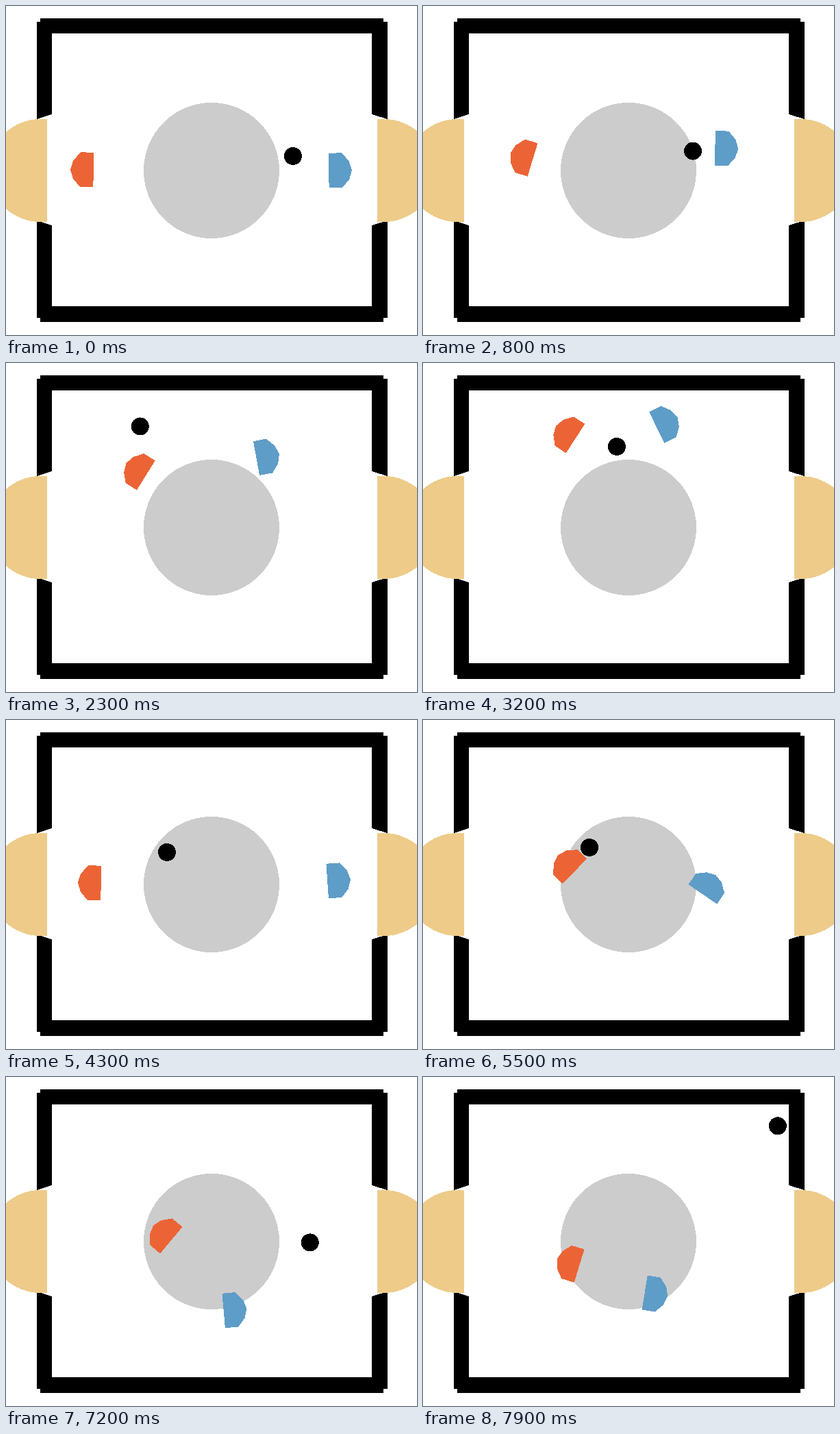
Animation of 600x480 px, one loop 8 s. Source, as an HTML page:

```html
<!DOCTYPE html>
<html>
<head>
<meta charset="utf-8">
<style>
  html, body { margin: 0; width: 100%; height: 100%; overflow: hidden; background: #fff; }
  svg { display: block; }
</style>
</head>
<body>
<svg width="600" height="480" viewBox="0 0 600 480" shape-rendering="crispEdges">
  <defs>
    <path id="paddle" d="M.3-25.3V25.3H-19L-29.5 13.2L-33.6 0L-29.5-13.2L-19-25.3Z"/>
    <path id="goal" d="M60 165H50A75 75 0 0 0 50 315H60Z"/>
  </defs>
  <circle cx="300" cy="240" r="99" fill="#ccc"/>
  <path d="M50 18H551V23H557V165L534 158V40H67V158L45 165V23H50Z"/>
  <path d="M50 461H551V455H557V313L534 320V438H67V320L45 313V455H50Z"/>
  <g fill="#eecb89">
    <use href="#goal"/>
    <use href="#goal" transform="translate(602) scale(-1 1)"/>
  </g>
  <use id="red" href="#paddle" fill="#ec6435"/>
  <use id="blue" href="#paddle" fill="#5e9dc8"/>
  <circle id="ball" r="13"/>
</svg>
<script>
const STEP = 100, STEPS = 80;
const byId = id => document.getElementById(id);

// The ball coasts after each hit: step, position, velocity per step, drag
const hits = [
  [0, 419, 219, 0, 0, 1],
  [7.5, 419, 219, -48.8, -14.4, .91],
  [15, 144, 138, -24.1, -6.1, .98],
  [30, 326, 60, -21, 31, 1],
  [32, 283, 122, -44.8, 19, .913],
  [41, 235, 193, 0, 0, 1],
  [54, 235, 193, 8, -7, 1],
  [56, 260, 187, 12.1, 27.76, .993]
];

// Paddle poses at turning points: x, y, heading in degrees; both go home after the goal
const turns = [0, 15, 32, 40, 41, 43, 55, 65, 72, 79];
const redHome = [127.5, 239, 1], blueHome = [471.5, 240, 179];
const paddles = {
  red: [
    redHome, [188, 211.5, 31], [222.3, 110, 33], [240, 95, 60],
    redHome, [138.5, 238, 1.5], [221.3, 220.5, 44], [239.8, 225, 58.5],
    [241, 238, 40], [227.8, 275.5, 17]
  ],
  blue: [
    blueHome, [387.5, 179, 183.4], [341.5, 94, 154], [295, 115, 155],
    blueHome, [469.5, 235, 176], [408.5, 254, 124.3], [329, 316, 156.5],
    [318, 341, 175], [324, 314.5, 189.3]
  ]
};

// Reflects a coordinate off the walls at lo and hi
const bounce = (v, lo, hi) => v < lo ? 2 * lo - v : v > hi ? 2 * hi - v : v;

function ballAt(step) {
  const [t, x0, y0, vx, vy, drag] = hits.findLast(h => h[0] <= step);
  const n = step - t;
  const path = drag === 1 ? n : (1 - drag ** n) / (1 - drag);
  const x = x0 + vx * path;
  const y = bounce(y0 + vy * path, 53, 425);
  const inMouth = y > 170 && y < 310;
  return [inMouth ? x : bounce(x, 80, 521), y];
}

function paddleAt(poses, step) {
  const i = Math.max(1, turns.findIndex(t => t >= step));
  const u = (step - turns[i - 1]) / (turns[i] - turns[i - 1]);
  return poses[i - 1].map((v, j) => v + (poses[i][j] - v) * u);
}

function place(id, [x, y, turn = 0]) {
  byId(id).setAttribute("transform", `translate(${x} ${y}) rotate(${turn})`);
}

const start = performance.now();
function tick() {
  const step = Math.floor((performance.now() - start) / STEP) % STEPS;
  place("ball", ballAt(step));
  for (const id in paddles) place(id, paddleAt(paddles[id], step));
  requestAnimationFrame(tick);
}
tick();
</script>
</body>
</html>
```
